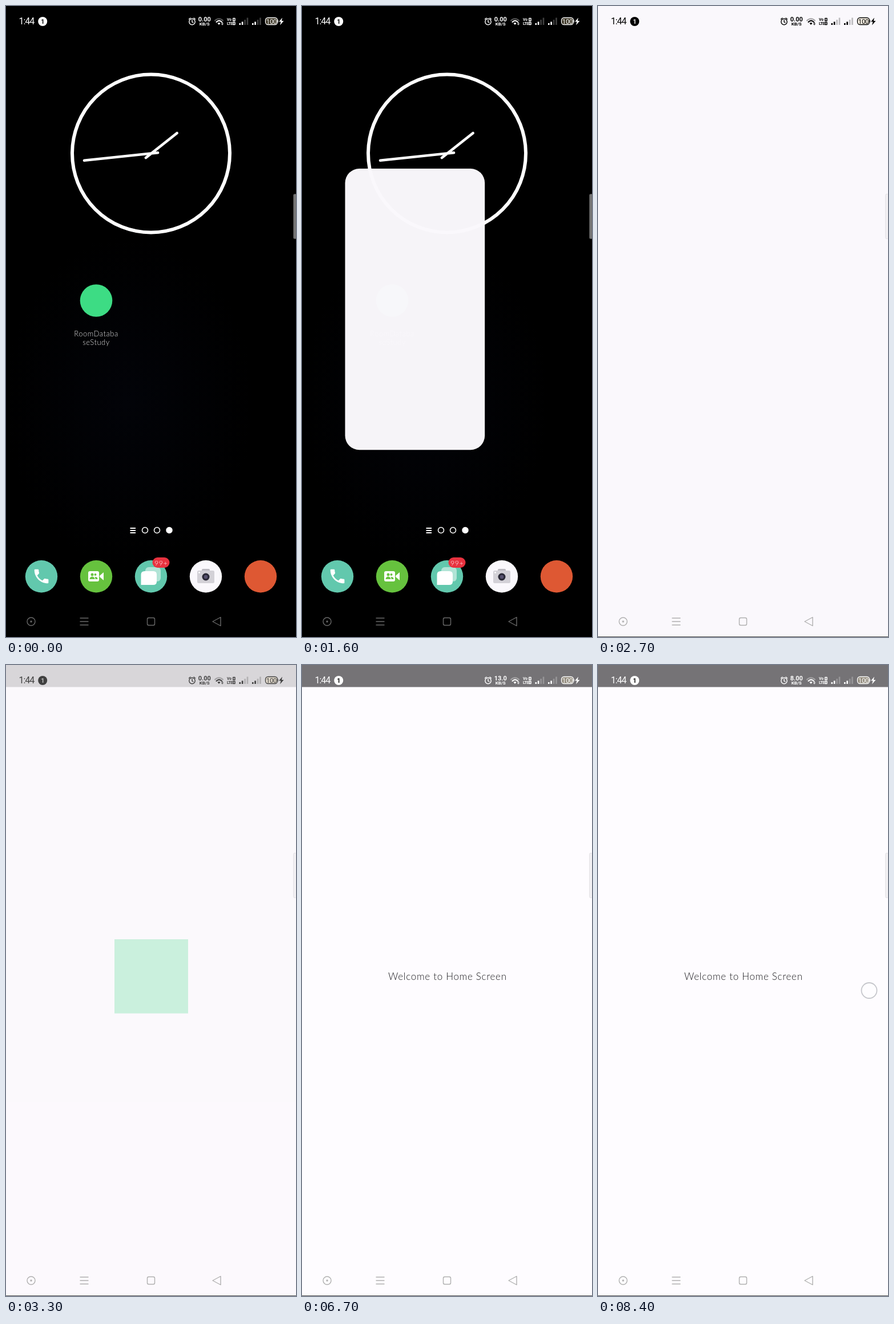
An HTML page for the animation above (8500 ms loop, 508x1102 px).

```html
<!DOCTYPE html>
<html lang="en">
<head>
<meta charset="utf-8">
<title>App launch</title>
<style>
  html, body { margin: 0; width: 100%; height: 100%; overflow: hidden; background: #000; }
  svg { display: block; width: 100%; height: 100%; }
  .line { fill: none; stroke: currentColor; stroke-linecap: round; stroke-linejoin: round; }
  .hand { font-family: Lato, "Open Sans", sans-serif; font-weight: 300; }
  .ui { font-family: Roboto, "Liberation Sans", sans-serif; fill: currentColor; }
  .bold { font-weight: 700; }
  .mid { text-anchor: middle; }
</style>
</head>
<body>
<svg viewBox="0 0 508 1102" preserveAspectRatio="none">
  <defs>
    <radialGradient id="glow"><stop offset="0" stop-color="#020308"/><stop offset="1" stop-color="#000"/></radialGradient>
    <g id="bars">
      <path d="M0 30h2.6v3H0zM4.3 27.500h2.600v5.500h-2.600z"/>
      <path d="M8.800 24h2.600v9h-2.600zM13.200 20.500h2.600v12.500h-2.600z" opacity=".25"/>
    </g>
  </defs>

  <g id="home">
    <rect width="508" height="1102"/>
    <ellipse cx="215" cy="690" rx="220" ry="290" fill="url(#glow)"/>
    <g fill="none" stroke="#fff" stroke-linecap="round">
      <circle cx="254" cy="257.500" r="138" stroke-width="6"/>
      <path d="M299.500 222L245 265M137 269.700L266 256.200" stroke-width="4.600"/>
    </g>
    <circle id="icon" cx="158" cy="514.500" r="28.300" fill="#3ddc84"/>
    <g class="hand mid" font-size="13" letter-spacing=".5" fill="#e4e4e4">
      <text x="158" y="576.500">RoomDataba</text>
      <text x="158" y="591.500">seStudy</text>
    </g>
    <g fill="none" stroke="#fff" stroke-width="1.500">
      <path d="M217.500 912h9.500M217.500 916h9.500M217.500 920h9.500" stroke-width="2"/>
      <circle cx="243.500" cy="915.500" r="5"/>
      <circle cx="264.500" cy="915.500" r="5"/>
      <circle cx="286" cy="915.500" r="5" fill="#fff"/>
    </g>
    <g id="dock"></g>
    <path transform="translate(45.600 979.600) scale(1.370)" fill="#fff" d="M6.620 10.790c1.440 2.830 3.760 5.140 6.590 6.590l2.200-2.200c.27-.27.67-.36 1.020-.24 1.120.37 2.330.57 3.570.57.55 0 1 .45 1 1V20c0 .55-.45 1-1 1-9.390 0-17-7.610-17-17 0-.55.45-1 1-1h3.500c.55 0 1 .45 1 1 0 1.250.2 2.450.57 3.570.11.35.03.74-.25 1.020z"/>
    <g fill="#fff">
      <rect x="144" y="987" width="19" height="18" rx="3"/>
      <path d="M164 995l7-6v14l-7-6z"/>
      <g fill="#69c440">
        <circle cx="151" cy="993" r="2.500"/><circle cx="156.500" cy="993" r="2"/>
        <path d="M146.500 1001c0-6 9-6 9 0zM156.500 1001c0-2-.5-3-1-4 3-.5 5 1 5 4z"/>
      </g>
      <rect x="244" y="980" width="27" height="25" rx="6" opacity=".5"/>
      <path d="M243 987h15q6 0 6 6v12q0 6-6 6h-21.500v-18q0-6 6.500-6z"/>
    </g>
    <rect x="256.500" y="963" width="30" height="18" rx="9" fill="#e8323f"/>
    <text class="hand mid" x="271.700" y="976.500" font-size="12.500" letter-spacing=".5" fill="#fff">99+</text>
    <rect x="343" y="983" width="14" height="6" rx="2" fill="#bdbbc2"/>
    <rect x="335" y="986" width="30" height="22" rx="2.500" fill="#d3d1d7"/>
    <circle cx="338.500" cy="989.500" r="1.400" fill="#fff"/>
    <circle cx="350" cy="997" r="6.500" fill="#2b2a38"/>
    <circle cx="350" cy="997" r="3.200" fill="#575270"/>
  </g>

  <rect id="win" fill="#faf8fc"/>

  <g id="app">
    <rect width="508" height="1102" fill="#fefcff"/>
    <rect width="508" height="38.500" fill="#757376"/>
    <rect id="logo" x="190" y="479" width="129" height="129.500" fill="#3ddc84"/>
    <text id="hello" class="hand" x="151" y="550" font-size="17" letter-spacing=".7" fill="#1c1b1f">Welcome to Home Screen</text>
  </g>

  <rect id="edge" y="1101" width="508" height="1" fill="#555"/>
  <rect id="handle" x="503.500" y="328.500" width="6" height="78" rx="2"/>

  <g id="status">
    <text class="ui" x="22.500" y="32" font-size="16" letter-spacing="-1">1:44</text>
    <circle cx="64.200" cy="27" r="8" fill="currentColor"/>
    <text id="count" class="ui bold mid" x="64.200" y="30.800" font-size="10.500">1</text>
    <g class="line" stroke-width="1.400">
      <circle cx="326" cy="27.500" r="5.200"/>
      <path d="M326 24.500v3.300l2 1.200M320.500 23l2.500-2M331.500 23l-2.500-2"/>
      <path d="M366 25.500c4-4.500 10-4.500 14 0" opacity=".35" stroke-width="2"/>
      <path d="M368.500 28c3-3 6.500-3 9.500 0" stroke-width="2"/>
    </g>
    <path d="M370.500 30c1.800-1.500 3.500-1.500 5 0l-2.500 3zM377 30.500l2-2 2 2zM377 31.500h4l-2 2z" fill="currentColor"/>
    <g class="ui bold mid">
      <text id="rate" x="347.700" y="27" font-size="11"></text>
      <text x="347.700" y="34.200" font-size="8">KB/S</text>
    </g>
    <g class="ui bold" font-size="6.800">
      <text x="387" y="26">Vo</text>
      <text x="387" y="33" letter-spacing="-.5">LTE</text>
    </g>
    <path class="line" d="M397.800 21.500h3.200v4.500h-3.200zM397.800 28.500h3.200v4h-3.200z" stroke-width="1.500"/>
    <use href="#bars" x="408.500" fill="currentColor"/>
    <use href="#bars" x="431" fill="currentColor"/>
    <rect id="cell" x="454.500" y="20.500" width="21" height="12" rx="4.500" stroke="currentColor" stroke-width="1.300"/>
    <path d="M476.300 24.500v4" stroke="currentColor" stroke-width="1"/>
    <text class="ui mid" x="465" y="30.800" font-size="11.500" letter-spacing="-.3">100</text>
    <path d="M484 20.500l-6 7h3.500l-1.500 6 6.500-7.500h-3.700z" fill="currentColor"/>
  </g>

  <g id="nav" class="line" stroke-width="1.400">
    <circle cx="44" cy="1075" r="7"/>
    <circle cx="44" cy="1075" r="1" fill="currentColor"/>
    <path d="M130 1069h14M130 1075h14M130 1081h14M362 1075l14-7.500v15z"/>
    <rect x="247.500" y="1068.500" width="13" height="13" rx="2.500"/>
  </g>

  <circle id="touch" r="13.500" stroke="#c6c7cc" stroke-width="1.800" fill="#fff" fill-opacity=".25"/>
</svg>

<script>
const LOOP = 8500, STEP = 100;
const el = {};
document.querySelectorAll('[id]').forEach(n => el[n.id] = n);

document.getElementById('dock').innerHTML =
  ['#62c8ad', '#66c23e', '#62c8ad', '#faf8fc', '#de5833']
    .map((c, i) => `<circle cx="${62 + 96 * i}" cy="996.2" r="28.2" fill="${c}"/>`).join('');

const set = (node, attrs) => {
  for (const k in attrs) node.setAttribute(k, attrs[k]);
};
const show = (node, on) => node.setAttribute('visibility', on ? 'inherit' : 'hidden');
const mix = (a, b, p) => a + (b - a) * p;
const gray = v => `rgb(${[v, v, v].map(Math.round)})`;

// [time, value] pairs, straight lines between them
function track(keys, t) {
  let prev = keys[0];
  for (const k of keys) {
    if (t < k[0]) return mix(prev[1], k[1], Math.max(0, (t - prev[0]) / (k[0] - prev[0] || 1)));
    prev = k;
  }
  return prev[1];
}

const openKeys = [[1300, 0], [1400, .02], [1500, .13], [1600, .415], [1700, 1]];
const pressKeys = [[1100, 28.3], [1200, 26.5], [1300, 25.5], [1400, 27], [1500, 28.3]];
const inkKeys = [[1700, 255], [2000, 0], [3200, 0], [3600, 255]];
const navKeys = [[1600, 105], [1700, 236], [2000, 176]];
const appKeys = [[3200, 0], [3600, 1]];
const taps = [[1200, 1400, 159, 516], [7800, 8000, 466.5, 580.5], [8400, 8500, 475, 568.5]];

function render(now) {
  const t = Math.floor((now % LOOP) / STEP) * STEP;
  const light = t >= 1700;

  const p = track(openKeys, t);
  const w = mix(58, 508, p), h = mix(58, 1102, p);
  show(el.win, t >= 1400);
  show(el.home, !light);
  set(el.win, {
    x: mix(158, 254, p) - w / 2, y: mix(514.5, 551, p) - h / 2,
    width: w, height: h, rx: light ? 0 : 25,
    opacity: light ? 1 : track([[1300, .3], [1600, .985]], t)
  });
  set(el.icon, { r: track(pressKeys, t) });

  set(el.app, { opacity: track(appKeys, t) });
  show(el.logo, t < 6700);
  show(el.hello, t >= 6700);

  const ink = track(inkKeys, t);
  el.status.style.color = gray(ink);
  el.count.style.fill = t === 1700 ? '#000' : gray(255 - ink);
  el.nav.style.color = gray(track(navKeys, t));
  set(el.cell, { fill: light && t < 2700 ? 'rgba(120,220,120,.35)' : 'rgba(240,215,150,.25)' });
  el.rate.textContent = t < 4200 ? '0.00' : t < 8200 ? '13.0' : '8.00';

  show(el.edge, light);
  set(el.handle, light ? { fill: '#f2f0f3', stroke: '#e4e2e6' } : { fill: '#747474', stroke: '#4a4a4a' });

  const tap = taps.find(k => t >= k[0] && t < k[1]);
  show(el.touch, tap);
  if (tap) set(el.touch, { cx: tap[2], cy: tap[3] });
}

const start = performance.now();
function tick() {
  render(performance.now() - start);
  requestAnimationFrame(tick);
}
tick();
</script>
</body>
</html>
```
